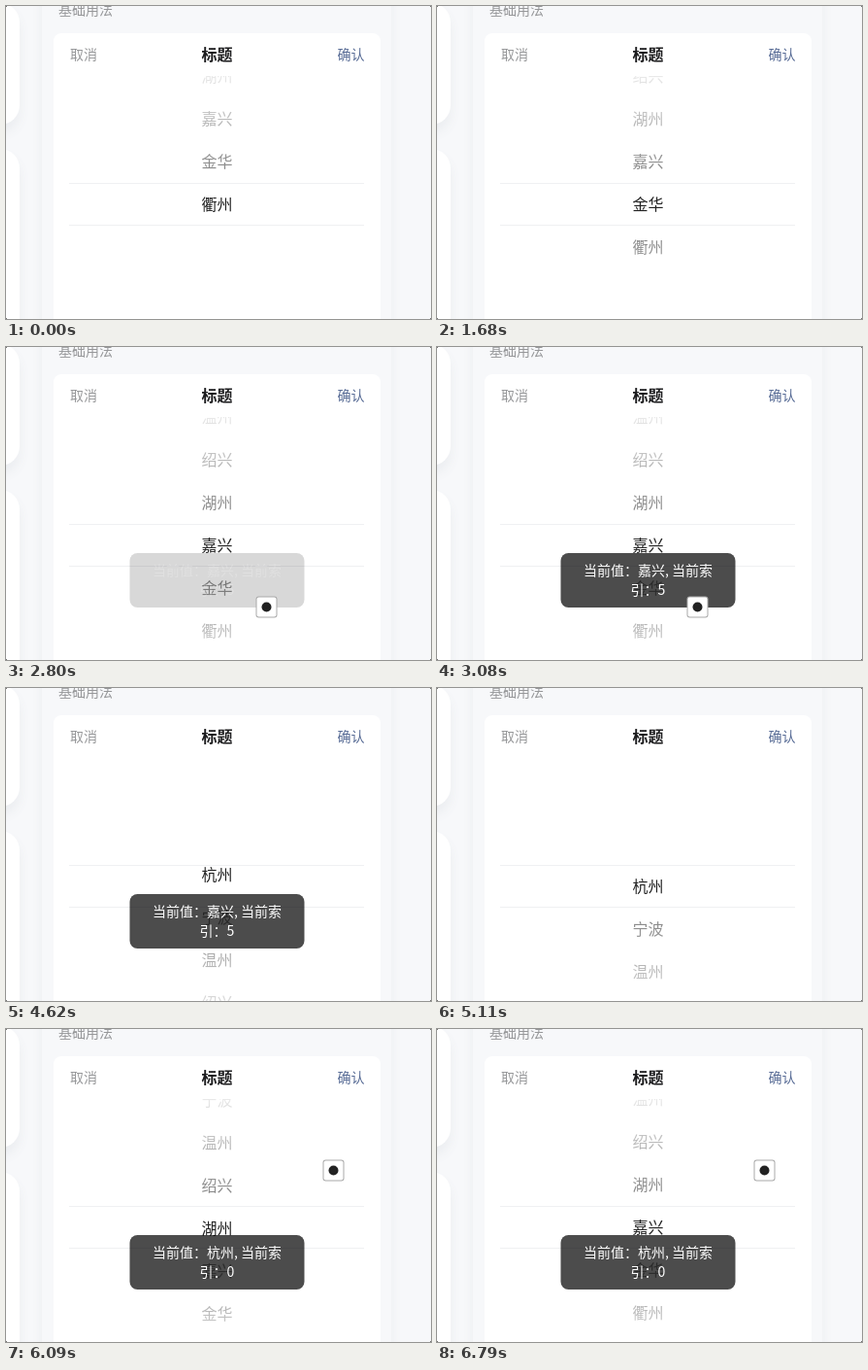
Animation, 438 px wide and 322 px high, one loop 6860 ms. Source, as an HTML page with a canvas:

```html
<!DOCTYPE html>
<html lang="zh-CN">
<head>
<meta charset="utf-8">
<title>选择器</title>
<style>
html, body { margin: 0; width: 100%; height: 100%; overflow: hidden; background: #f7f8fa; }
canvas { display: block; width: 438px; height: 322px; }
</style>
</head>
<body>
<canvas id="stage" width="438" height="322"></canvas>
<script>
const ctx = document.getElementById('stage').getContext('2d');
const W = 438, H = 322, LOOP = 6860, STEP = 70;
const FONT = '"Noto Sans CJK SC", "Noto Sans CJK", "Noto Sans", sans-serif';
const CITIES = ['杭州', '宁波', '温州', '绍兴', '湖州', '嘉兴', '金华', '衢州'];
const ROW = 44, MID = 204, TOP = 72, CX = 217.5;

const clamp = v => Math.max(0, Math.min(1, v));

// cubic-bezier(.23, 1, .68, 1)
function settle(x) {
  let lo = 0, hi = 1;
  for (let i = 0; i < 24; i++) {
    const s = (lo + hi) / 2, r = 1 - s;
    if (3 * r * r * s * 0.23 + 3 * r * s * s * 0.68 + s ** 3 < x) lo = s;
    else hi = s;
  }
  return 1 - (1 - lo) ** 3;
}

// Drag by hand, then glide for one second
function swipe(t, start, release, from, mid, to) {
  if (t < release) {
    return from + (mid - from) * clamp((t - start) / (release - start)) ** 1.3;
  }
  return mid + (to - mid) * settle(clamp((t - release) / 1000));
}

function position(t) {
  if (t < 1680) return 7;
  if (t < 4000) return swipe(t, 1680, 1740, 6, 6, 5);
  if (t < 5600) return swipe(t, 4020, 4235, 5, 1.47, 0);
  return swipe(t, 5700, 5900, 0, 2.75, 5);
}

function box(x, y, w, h, r, fill, shadowY) {
  ctx.save();
  if (shadowY) {
    ctx.shadowColor = '#ebedf0';
    ctx.shadowBlur = 12;
    ctx.shadowOffsetY = shadowY;
  }
  ctx.fillStyle = fill;
  ctx.beginPath();
  ctx.roundRect(x, y, w, h, r);
  ctx.fill();
  ctx.restore();
}

function text(str, x, y, size, color, align = 'center', weight = 400) {
  ctx.font = `${weight} ${size}px ${FONT}`;
  ctx.textAlign = align;
  ctx.fillStyle = color;
  ctx.fillText(str, x, y + size * 0.38);
}

function fade(y, from, to) {
  const g = ctx.createLinearGradient(0, y, 0, y + 110);
  g.addColorStop(0, `rgba(255,255,255,${from})`);
  g.addColorStop(1, `rgba(255,255,255,${to})`);
  ctx.fillStyle = g;
  ctx.fillRect(49, y, 337, 110);
}

function page() {
  ctx.fillStyle = '#f7f8fa';
  ctx.fillRect(0, 0, W, H);
  box(-100, -3, 114, 125, 20, '#fff', 8);
  box(-100, 147, 114, 400, 20, '#fff', 8);
  box(37, -100, 360, 600, 20, '#f7f8fa', 4);
  text('基础用法', 54, 4, 14, '#969799', 'left');
  box(49, 28, 337, 340, 8, '#fff');
  text('取消', 66, 50, 14, '#969799', 'left');
  text('标题', CX, 50, 16, '#1c1c1e', 'center', 700);
  text('确认', 369.5, 50, 14, '#576b95', 'right');
}

function picker(pos) {
  ctx.save();
  ctx.beginPath();
  ctx.rect(49, TOP, 337, 264);
  ctx.clip();
  CITIES.forEach((city, i) => text(city, CX, MID + (i - pos) * ROW, 16, '#222'));
  fade(TOP, 0.9, 0.4);
  fade(226, 0.4, 0.9);
  ctx.restore();
  ctx.fillStyle = '#eff0f2';
  ctx.fillRect(65, 182, 304, 1);
  ctx.fillRect(65, 225, 304, 1);
}

function toast(t, start, index) {
  const alpha = Math.min(clamp((t - start) / 310), 1 - clamp((t - start - 1990) / 300));
  if (alpha <= 0) return;
  ctx.globalAlpha = alpha;
  box(127.5, 212, 180, 56, 8, 'rgba(0,0,0,.7)');
  text(`当前值：${CITIES[index]}, 当前索`, CX, 230, 14, '#fff');
  text(`引：${index}`, CX, 250, 14, '#fff');
  ctx.globalAlpha = 1;
}

function button(x, y) {
  box(x, y, 22, 22, 3, '#a9a9a9');
  box(x + 1, y + 1, 20, 20, 2, '#fff');
  box(x + 6, y + 6, 10, 10, 5, '#222');
}

function corners() {
  ctx.fillStyle = '#777';
  for (const x of [0, W - 1]) {
    for (const y of [0, H - 1]) ctx.fillRect(x, y, 1, 1);
  }
}

function draw(now) {
  const t = Math.floor((now % LOOP) / STEP) * STEP;
  page();
  picker(position(t));
  toast(t, 2732, 5);
  toast(t, 5187, 0);
  if (t >= 1750 && t < 3850) button(257.5, 256.5);
  if (t >= 5950) button(326.5, 134.5);
  corners();
}

const began = performance.now();
function tick() {
  draw(performance.now() - began);
  requestAnimationFrame(tick);
}
tick();
</script>
</body>
</html>
```
